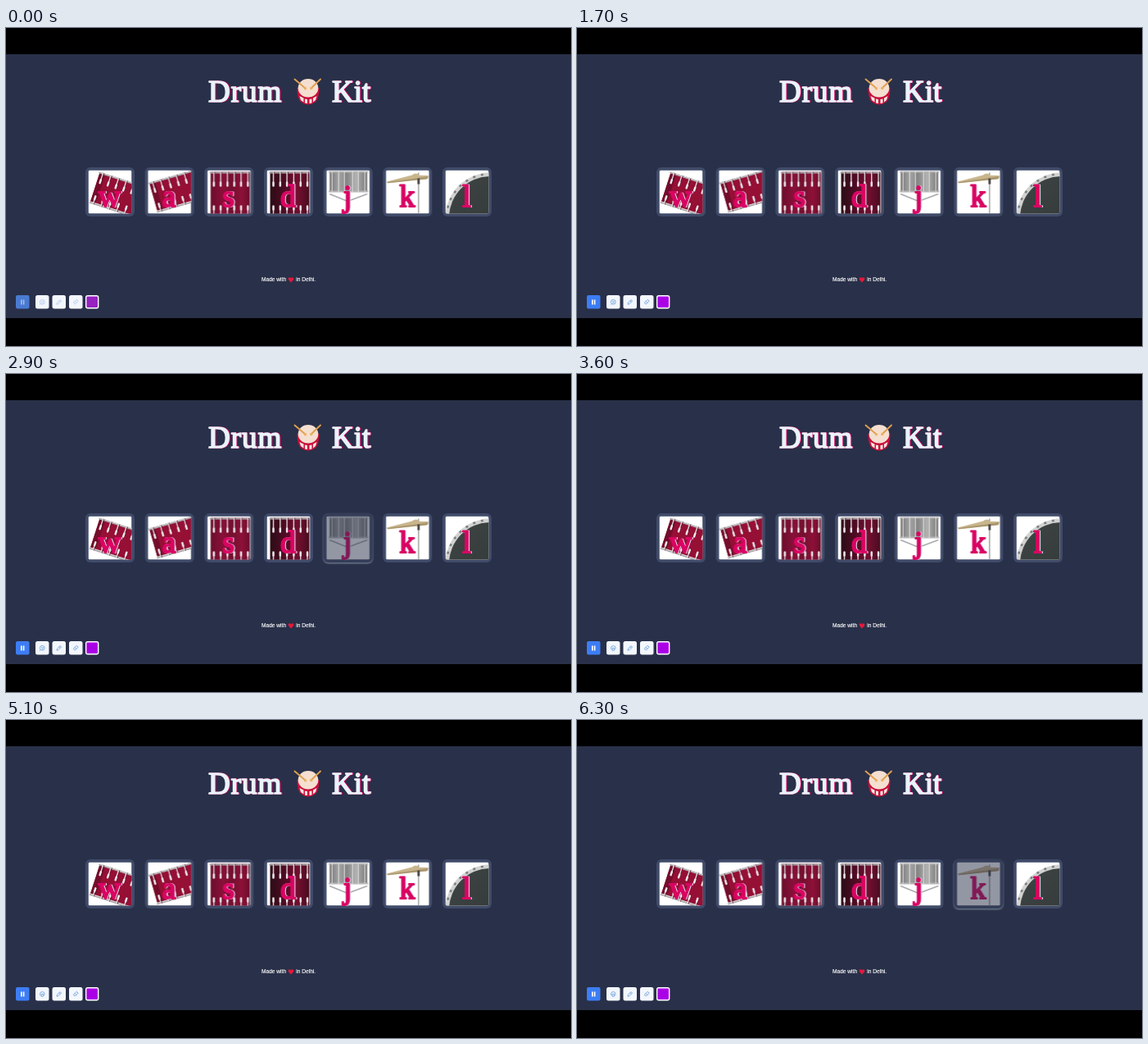
Write an HTML page that moves like this. It is 690x388 px and loops after 6.4 s.

```html
<!DOCTYPE html>
<html lang="en">
<head>
<meta charset="utf-8">
<title>Drum Kit</title>
<style>
  html, body { margin: 0; width: 100%; height: 100%; overflow: hidden; background: #000; }
  svg { display: block; width: 100vw; height: 100vh; }
  text { font-family: "Liberation Serif", serif; stroke-linejoin: round; }
  .title { font-size: 37px; fill: #eaf3fa; stroke: #eaf3fa; stroke-width: 1.7; filter: drop-shadow(1.2px 0 0 #da0463); }
  .letter { font-size: 38px; fill: #da0463; stroke: #da0463; stroke-width: 2; text-anchor: middle; filter: drop-shadow(1.2px 0 0 #dbedf3); }
  .credit { font: 6.6px "Liberation Sans", sans-serif; fill: #fff; stroke: #fff; stroke-width: .15; }
  .tile { animation: 6400ms step-end infinite; }
  .icon { fill: none; stroke: #72a5d8; stroke-width: .9; stroke-linejoin: round; animation: sharpen 6400ms linear infinite; }
  .pause { fill: #fff; animation: sharpen 6400ms linear infinite; }
  .blue { animation: blue 6400ms linear infinite; }
  .purple { animation: purple 6400ms linear infinite; }
  .early { animation: early 6400ms step-end infinite; }
  .late { animation: late 6400ms step-end infinite; }
  @keyframes sharpen { 0%, 1.5% { opacity: .5; } 11%, 100% { opacity: 1; } }
  @keyframes blue { 0%, 1.5% { fill: #4a7bd2; } 11%, 100% { fill: #3d7df4; } }
  @keyframes purple { 0%, 1.5% { fill: #9722c2; } 11%, 100% { fill: #aa00e6; } }
  @keyframes early { 0% { opacity: 1; } 50% { opacity: 0; } }
  @keyframes late { 0% { opacity: 0; } 50% { opacity: 1; } }
</style>
</head>
<body>
<svg viewBox="0 0 690 388" preserveAspectRatio="none">
  <defs>
    <clipPath id="inner"><rect width="53" height="53" rx="2"/></clipPath>
    <linearGradient id="red">
      <stop stop-color="#6a0e2e"/><stop offset=".3" stop-color="#8a1038"/>
      <stop offset=".55" stop-color="#74102f"/><stop offset=".8" stop-color="#8e1038"/>
      <stop offset="1" stop-color="#6a0e2c"/>
    </linearGradient>
    <linearGradient id="wine">
      <stop stop-color="#2c0c17"/><stop offset=".3" stop-color="#4a0c22"/>
      <stop offset=".7" stop-color="#740f30"/><stop offset="1" stop-color="#480c20"/>
    </linearGradient>
    <linearGradient id="steel">
      <stop stop-color="#777"/><stop offset=".25" stop-color="#a5a5a5"/><stop offset=".45" stop-color="#858585"/>
      <stop offset=".7" stop-color="#b2b2b2"/><stop offset="1" stop-color="#777"/>
    </linearGradient>
    <linearGradient id="skin" x2="1" y2="1">
      <stop stop-color="#3e4544"/><stop offset="1" stop-color="#2c3332"/>
    </linearGradient>
  </defs>

  <rect width="690" height="388"/>
  <rect y="32" width="690" height="322" fill="#293049"/>

  <text class="title" x="247" y="89.500" letter-spacing="1">Drum</text>
  <text class="title" x="398" y="89.500">Kit</text>

  <g id="emblem">
    <path d="M355.500 73q0 14 5 17.500 8.500 6 17 0 5-3.500 5-17.500z" fill="#c90f3c"/>
    <path d="M358.500 83l1.500 5 3.500 2.500v-5zM365 86.500v5l3 .5v-5zM370.500 87v5l3-.5v-5zM379.500 83l-1.500 5-3 2.500v-5z" fill="#f4e5df"/>
    <ellipse cx="369" cy="73.300" rx="12.300" ry="11.300" fill="#f5dfd0"/>
    <path d="M352.500 62.500l13 11M384 62.500l-11.500 11" stroke="#dfa04d" stroke-width="1.900" stroke-linecap="round"/>
    <circle cx="365.500" cy="73.800" r="1.700" fill="#eab363"/><circle cx="372.800" cy="73.500" r="1.700" fill="#eab363"/>
  </g>

  <g id="tiles"></g>

  <text class="credit" x="312" y="309.300">Made with</text>
  <path d="M348 310.500l-3-3.200q-1-2.800 1.300-3.100 1.200 0 1.700 1.200.5-1.200 1.700-1.200 2.300.3 1.300 3.100z" fill="#e5193c"/>
  <text class="credit" x="354.300" y="309.300">in Delhi.</text>

  <g id="toolbar">
    <rect class="blue" x="12" y="326" width="16.500" height="16.500" rx="2"/>
    <path class="pause" d="M18 331.500h1.600v6h-1.600zM20.800 331.500h1.600v6h-1.600z"/>
    <g fill="#f3f6fd">
      <rect x="36" y="326" width="16.500" height="16.500" rx="2.500"/>
      <rect x="56.500" y="326" width="16.500" height="16.500" rx="2.500"/>
      <rect x="77" y="326" width="16.500" height="16.500" rx="2.500"/>
    </g>
    <g class="icon">
      <g class="early"><circle cx="44.300" cy="334.300" r="2.900"/><path d="M43 333.800h2.800M43.500 335.300h2M42 336.500l-.8 1.200"/></g>
      <g class="late"><path d="M42.300 336.500q-2-2.600.3-4.500 2.200-1 4 .5 1.200 2-.3 3.700M43.200 334.300h2.200v3h-2.200z"/></g>
      <path d="M62 337.200l.5-2 3.600-3.600 1.500 1.500-3.600 3.600zM65 332.700l1.400 1.400"/>
      <path d="M82.500 335l3.300-3.300q1.200-.5 2.300 1.500l-3.500 3.600q-1.600.2-2.100-1.800zM84 333.500l2 2"/>
    </g>
    <rect class="purple" x="97.700" y="326.700" width="15" height="15" rx="2" stroke="#fff" stroke-width="1.400"/>
  </g>
</svg>

<script>
const LOOP = 6400;
const PITCH = 72.67;

// Evenly spaced tension rods along both rims of a shell, each ending in a small lug.
const rods = (first, gap, count, height, length) => {
  let thin = "", lugs = "";
  for (let i = 0; i < count; i++) {
    const x = first + i * gap;
    const bottom = height - length * 0.75;
    thin += `M${x} -1V${length}M${x} ${height + 1}V${bottom}`;
    lugs += `M${x} ${length - 4}v4M${x} ${bottom + 4}v-4`;
  }
  return `<path d="${thin}" stroke="#5f1530" stroke-width=".8" transform="translate(1.2)"/>
    <path d="${thin}" stroke="#ddd6d9" stroke-width="1.400"/>
    <path d="${lugs}" stroke="#efecee" stroke-width="2.400" stroke-linecap="round"/>`;
};

const tom = (x, y, angle, height) => `
  <g transform="translate(${x} ${y}) rotate(${angle})">
    <rect width="60" height="${height}" fill="#960f35"/>
    <rect width="7" height="${height}" fill="#730d2b"/>
    <path d="M-1 0h62M-1 ${height}h62" stroke="#aaa5a8" stroke-width="2.400"/>
    <path d="M-1 -.8h62M-1 ${height - 0.8}h62" stroke="#e8e6e7" stroke-width=".8"/>
    ${rods(4, 10, 6, height, 12)}
  </g>`;

const snare = fill => `
  <rect x="4" y="2" width="48" height="53" fill="url(#${fill})"/>
  <path d="M3 3h50" stroke="#aaa6a8" stroke-width="2.200"/>
  <g transform="translate(0 3)">${rods(8, 8.300, 6, 53, 16)}</g>`;

const steelSnare = `
  <rect x="4" y="2" width="46" height="24" fill="url(#steel)"/>
  <path d="M3 2h48M3 26h48" stroke="#b5b5b5" stroke-width="1.800"/>
  <path d="M7 1v25M15 1v26M22 1v26M32 1v26M39 1v26M47 1v25" stroke="#dedede" stroke-width="1"/>
  <path d="M4 29l22 9 24-9M27 27v26" fill="none" stroke="#a5a8ad" stroke-width="1.600"/>`;

const cymbal = `
  <path d="M40 3v50" stroke="#8c8c8c" stroke-width="1.200"/>
  <path d="M1 14L32 6q5-4 9 .3l11 .2-2 4.500-20 2-28 3z" fill="#c8b58c"/>
  <path d="M2 14.500l30-4 20-3-1 3-20 2-28 3z" fill="#a8966f"/>
  <path d="M40 10v7" stroke="#444" stroke-width="2.800"/>`;

const kick = `
  <circle cx="55" cy="58" r="55" fill="#d2d3d1"/>
  <circle cx="55" cy="58" r="50.500" fill="url(#skin)"/>
  <circle cx="55" cy="58" r="53.500" fill="none" stroke="#7d8082" stroke-width="2.600" stroke-dasharray="3 7"/>`;

// Each key: letter, artwork, and the moments (ms) at which it goes down and up.
const keys = [
  ["w", tom(14, 3, 18, 38), []],
  ["a", tom(2, 16, -16, 36), [[3900, 4100]]],
  ["s", snare("red"), [[6000, 6200]]],
  ["d", snare("wine"), [[2300, 2500]]],
  ["j", steelSnare, [[2900, 3100]]],
  ["k", cymbal, [[3100, 3300], [6300, LOOP]]],
  ["l", kick, [[3400, 3600], [4300, 4500]]]
];

const UP = "opacity: 1; filter: none;";
const DOWN = "opacity: .5; filter: drop-shadow(0 1.3px 1.2px #dbedf3);";
const at = (ms, look) => `${ms / LOOP * 100}% { ${look} }`;

let rules = "";
document.getElementById("tiles").innerHTML = keys.map(([letter, art, presses], i) => {
  const steps = presses.map(([down, up]) => at(down, DOWN) + (up < LOOP ? at(up, UP) : ""));
  rules += `@keyframes press-${letter} { 0% { ${UP} } ${steps.join(" ")} 100% { ${UP} } }\n`;
  return `
    <g transform="translate(${97 + i * PITCH} 170)">
      <g class="tile" style="animation-name: press-${letter}">
        <rect width="60" height="60" rx="6" fill="#404b69"/>
        <g transform="translate(3.500 3.500)" clip-path="url(#inner)">
          <rect width="53" height="53" fill="#fff"/>${art}
        </g>
        <text class="letter" x="29.500" y="47.500">${letter}</text>
      </g>
    </g>`;
}).join("");

const sheet = document.createElement("style");
sheet.textContent = rules;
document.head.append(sheet);
</script>
</body>
</html>
```
